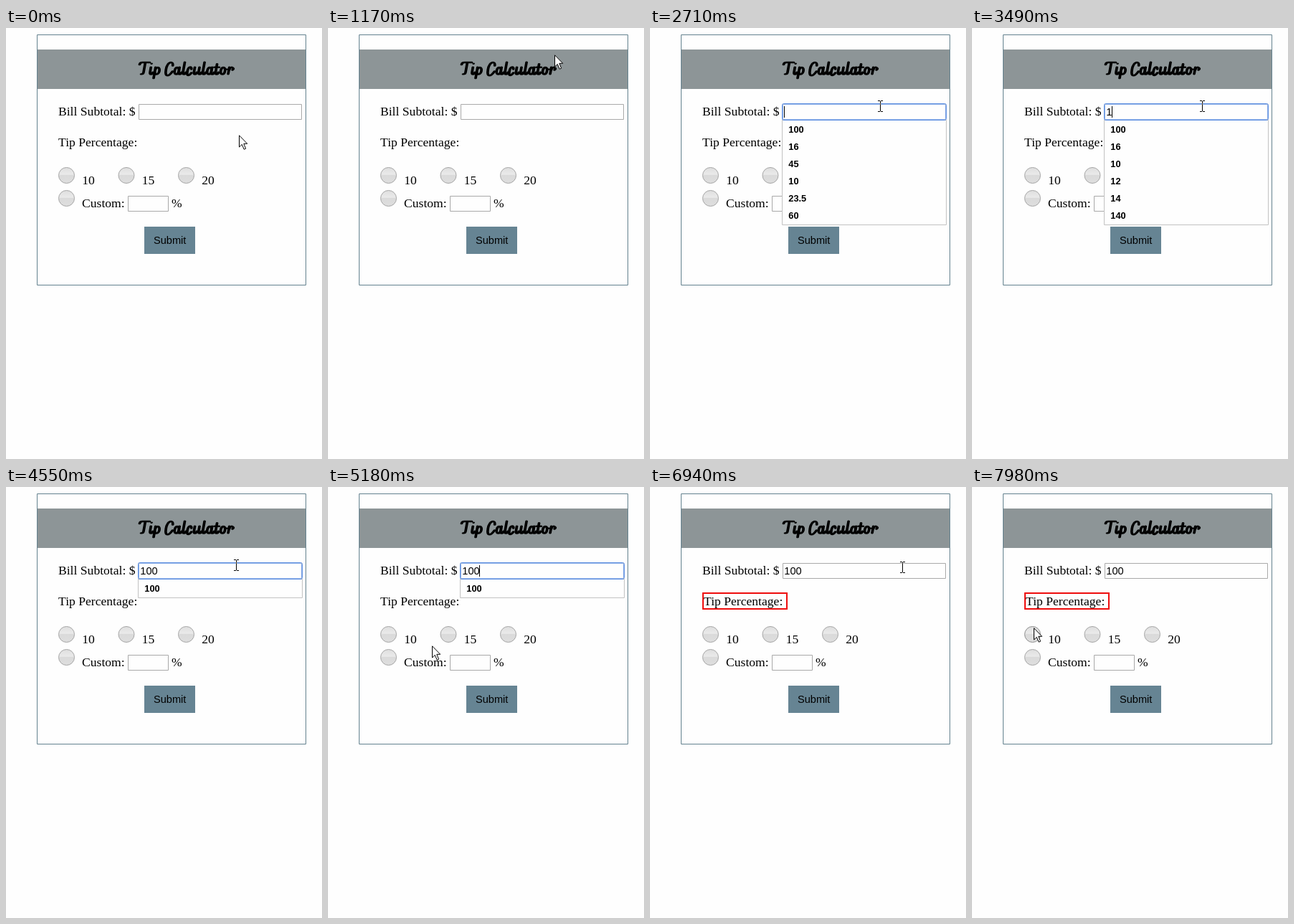
Animation, 441 px wide and 601 px high, one loop 8 s. Source, as an HTML page with a canvas:

```html
<!DOCTYPE html>
<html lang="en">
<head>
<meta charset="utf-8">
<title>Tip Calculator</title>
<style>
html, body { margin: 0; width: 100%; height: 100%; overflow: hidden; background: #fefefe; }
canvas { display: block; }
</style>
</head>
<body>
<canvas id="stage" width="441" height="601" role="img" aria-label="Tip Calculator form"></canvas>
<script>
const ctx = document.getElementById('stage').getContext('2d');
const LOOP = 8000;
const SERIF = '17.6px "Liberation Serif", serif';
const SANS = '14.6px "Liberation Sans", sans-serif';
const BOLD = 'bold 12.8px "Liberation Sans", sans-serif';

const FOCUS = 2580, OPEN = 2710, CLOSE = 5470, BLUR = 5590, PRESS = 5710, FAIL = 6140;
const BILL = '100';
const KEYS = [3490, 3860, 3990];
const HISTORY = ['100', '16', '45', '10', '23.5', '60', '12', '14', '140'];

// Upright pen strokes on a baseline at y = 0, slanted when drawn
const hook = (x, h) => `M${x} ${-h}V-4Q${x} -1 ${x + 2} -1T${x + 4} -4`;
const oval = (x, w) => `M${x} -5.8a${w / 2} 4.8 0 1 1 ${w} 0a${w / 2} 4.8 0 1 1 ${-w} 0`;
const crescent = (x, w, h) =>
  `M${x + w} ${-h * 0.75}C${x + w} ${-h * 1.15} ${x} ${-h * 1.15} ${x} ${-h * 0.45}S${x + w * 0.7} ${h * 0.1} ${x + w + 1} ${-h * 0.3}`;

// Advance width and strokes of each letter
const SCRIPT = {
  ' ': [4.9, ''],
  T: [13, 'M-1.5-14.5Q-1.5-17.6 2-17.6H12M6-17V-4Q6-1 3-1.2'],
  C: [12.6, crescent(1.2, 8.5, 17.3)],
  a: [11.2, oval(1, 5.8) + hook(7, 11)],
  c: [8.9, crescent(1, 5, 10.8)],
  i: [6.5, hook(2, 11) + 'M2-16v.1'],
  l: [6.7, hook(1.8, 18)],
  o: [10.4, oval(1, 6) + 'M7-8h2.5'],
  p: [11, 'M2-11V4.5' + oval(2, 6.2)],
  r: [10.3, 'M1.8-11V-1.4M1.8-6Q3-12 6-10.5T6.8-7'],
  t: [7.6, hook(1.8, 15.5) + 'M-1-10.8h6.5'],
  u: [12, hook(1.5, 11) + hook(8, 11)]
};

const easeIn = p => p * p;
const easeOut = p => 1 - (1 - p) ** 2;
const smooth = p => p * p * (3 - 2 * p);

// Pointer legs: start time, end time, end point, easing
const START = [325, 149];
const LEGS = [
  [0, 420, 368, 93, easeIn],
  [930, 1170, 316, 37, smooth],
  [1290, 2310, 321, 109, easeOut],
  [4670, 4940, 118, 190, easeOut],
  [4940, 5330, 221, 311, smooth],
  [6490, 6790, 398, 137, easeIn],
  [6790, 6940, 352, 112, smooth],
  [6940, 7980, 86, 196, smooth]
];

// The pointer is seen in steps of about 130 ms
function pointerAt(t) {
  let [x, y] = START;
  for (const [from, to, endX, endY, ease] of LEGS) {
    if (t < from) break;
    const steps = Math.round((to - from) / 130);
    const done = Math.min(steps, Math.floor((t - from) / (to - from) * steps + 1e-6));
    const p = ease(done / steps);
    x += (endX - x) * p;
    y += (endY - y) * p;
  }
  return [Math.round(x), Math.round(y)];
}

function text(s, x, y, font = SERIF) {
  ctx.font = font;
  ctx.fillStyle = '#000';
  ctx.fillText(s, x, y);
}

function fill(x, y, w, h, color) {
  ctx.fillStyle = color;
  ctx.fillRect(x, y, w, h);
}

function frame(x, y, w, h, color, line = 1, radius = 0) {
  ctx.strokeStyle = color;
  ctx.lineWidth = line;
  ctx.beginPath();
  ctx.roundRect(x + line / 2, y + line / 2, w - line, h - line, radius);
  ctx.stroke();
}

// Squashing the pen gives thick stems and thin turns
function drawScript(s, x, y) {
  const squash = 0.64, slant = 0.18;
  ctx.save();
  ctx.scale(1, squash);
  ctx.strokeStyle = '#000';
  ctx.lineWidth = 3.7;
  ctx.lineCap = ctx.lineJoin = 'round';
  for (const ch of s) {
    const [advance, strokes] = SCRIPT[ch];
    const path = new Path2D();
    path.addPath(new Path2D(strokes), new DOMMatrix([1, 0, -slant, 1 / squash, x, y / squash]));
    ctx.stroke(path);
    x += advance;
  }
  ctx.restore();
}

function radio(x, y, [px, py]) {
  const hover = Math.hypot(px - x, py - y) < 11;
  const g = ctx.createLinearGradient(0, y - 11, 0, y + 11);
  g.addColorStop(0, '#dedede');
  g.addColorStop(0.44, '#eaeaea');
  g.addColorStop(0.5, '#dadada');
  g.addColorStop(1, '#dedede');
  ctx.fillStyle = g;
  ctx.strokeStyle = hover ? '#8e8e8e' : '#a6a6a6';
  ctx.lineWidth = 1;
  ctx.beginPath();
  ctx.arc(x, y, 11, 0, Math.PI * 2);
  ctx.fill();
  ctx.stroke();
}

function drawHints(typed) {
  const items = HISTORY.filter(s => s.startsWith(typed)).slice(0, 6);
  const h = items.length * 24 + 3;
  fill(184, 128, 230, h, '#fefefe');
  frame(184, 128, 230, h, '#c2c2c2');
  items.forEach((s, i) => text(s, 193.3, 146 + i * 24, BOLD));
}

function drawSubtotal(t) {
  const pressed = KEYS.filter(k => k <= t);
  const typed = BILL.slice(0, pressed.length);
  frame(185, 106, 228, 22, '#a9a9a9');
  text(typed, 187.3, 122, SANS);
  if (t >= OPEN && t < CLOSE) drawHints(typed);
  if (t < FOCUS || t >= BLUR) return;
  frame(184, 105, 230, 24, '#5d8fe0', 1, 2);
  frame(185, 106, 228, 22, '#8fb0e8', 1, 1);
  const idle = t - Math.max(FOCUS, ...pressed);
  if (idle % 1060 < 530) fill(187 + typed.length * 8, 109, 1, 16, '#000');
}

function drawForm(t, pointer) {
  const failed = t >= FAIL;
  fill(0, 0, 441, 601, '#fefefe');
  frame(43, 9, 376, 350, '#64828f');
  fill(44, 30, 374, 55, '#8d9597');
  drawScript('Tip Calculator', 185.3, 65.6);

  text('Bill Subtotal: $', 73, 122);
  text('Tip Percentage:', failed ? 75 : 73, 165);
  if (failed) frame(73, 147, 119, 24, '#ee0c0c', 2);

  ['10', '15', '20'].forEach((s, i) => {
    const x = 84.5 + i * 83.5;
    radio(x, 205.5, pointer);
    text(s, x + 21.7, 218);
  });
  radio(84.5, 237.5, pointer);
  text('Custom:', 106, 250);
  frame(170, 234, 57, 22, '#a9a9a9');
  text('%', 231, 250);

  fill(193, 277, 71, 38, '#668493');
  text('Submit', 206, 301, SANS);
  if (t >= PRESS && !failed) frame(192, 276, 73, 40, '#76a0ea', 1.5, 2);

  drawSubtotal(t);
}

// The text beam inverts what lies under it
function drawBeam(x, y) {
  ctx.globalCompositeOperation = 'difference';
  fill(x, y - 7, 1, 14, '#fff');
  for (const row of [y - 8, y + 7]) {
    fill(x - 3, row, 3, 1, '#fff');
    fill(x + 1, row, 3, 1, '#fff');
  }
  ctx.globalCompositeOperation = 'source-over';
}

function drawArrow(x, y) {
  const shape = new Path2D('M.5.8V17L4.3 13.4L7.2 20.2L9.6 19.2L6.8 12.3H11.7Z');
  ctx.save();
  ctx.translate(x, y);
  ctx.fillStyle = '#fff';
  ctx.strokeStyle = '#000';
  ctx.lineWidth = 1;
  ctx.fill(shape);
  ctx.stroke(shape);
  ctx.restore();
}

function tick() {
  const t = performance.now() % LOOP;
  const [x, y] = pointerAt(t);
  const overField = x >= 185 && x < 413 && y >= 106 && y < 128;
  drawForm(t, [x, y]);
  (overField ? drawBeam : drawArrow)(x, y);
  requestAnimationFrame(tick);
}
tick();
</script>
</body>
</html>
```
